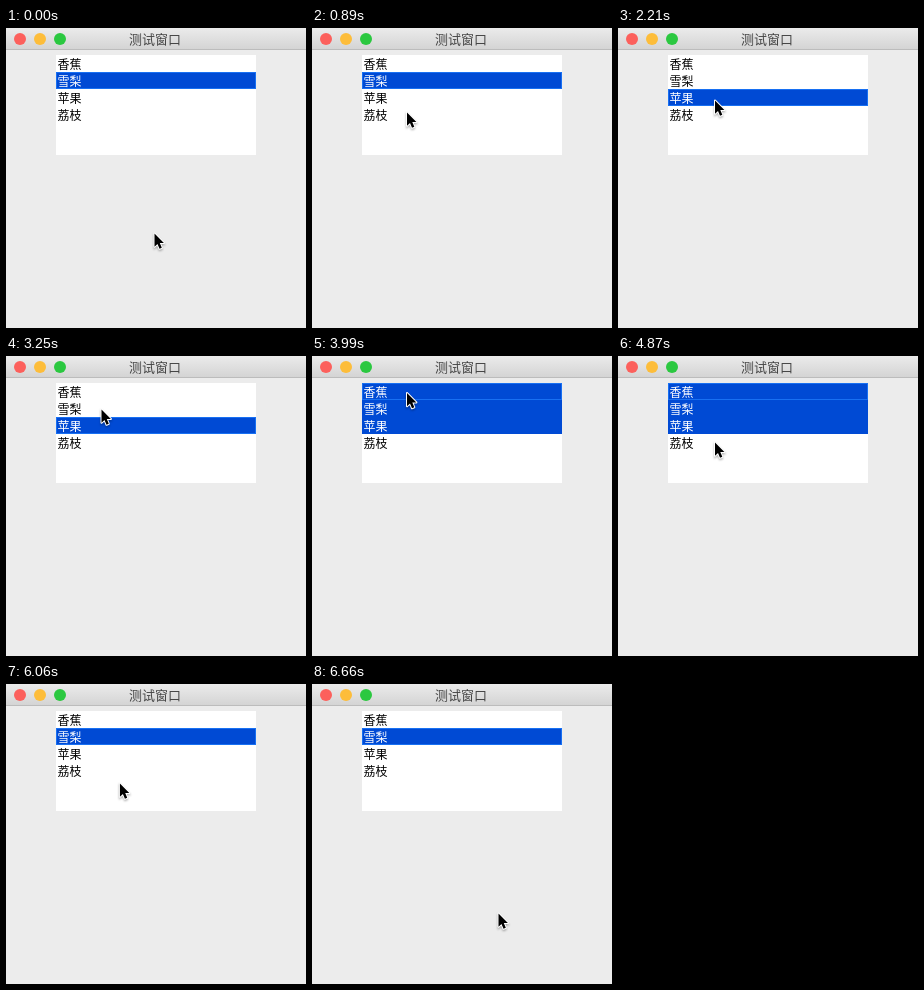
Write an HTML page that moves like this. It is 300 by 300 pixels and loops after 7.86 s.

```html
<!DOCTYPE html>
<html lang="zh-CN">
<head>
<meta charset="utf-8">
<title>测试窗口</title>
<style>
  html, body { margin: 0; width: 100%; height: 100%; overflow: hidden; background: #ececec; }
  svg { display: block; width: 100vw; height: 100vh; }
  text { font-family: "Noto Sans CJK SC", "Noto Sans CJK", "Noto Sans CJK JP", sans-serif; }
</style>
</head>
<body>
<svg viewBox="0 0 300 300">
  <defs>
    <linearGradient id="bar" x2="0" y2="1">
      <stop offset="0" stop-color="#ebebeb"/>
      <stop offset="1" stop-color="#d3d3d3"/>
    </linearGradient>
    <filter id="soft" x="-50%" y="-50%" width="200%" height="200%">
      <feGaussianBlur stdDeviation="0.9"/>
    </filter>
    <path id="arrow" d="M0 0V13.2L3 10.4L5 15.3L7.3 14.3L5.3 9.5H9.4Z"/>
  </defs>
  <rect width="300" height="300" fill="#ececec"/>
  <rect width="300" height="22" fill="url(#bar)"/>
  <rect y="21" width="300" height="1" fill="#bcbcbc"/>
  <g id="buttons"></g>
  <text x="149" y="16" font-size="13" text-anchor="middle" fill="#464646">测试窗口</text>
  <rect x="50" y="27" width="200" height="100" fill="#fff"/>
  <g id="list"></g>
  <g id="cursor">
    <use href="#arrow" y="1.5" opacity=".35" stroke="#000" stroke-width="1.5" filter="url(#soft)"/>
    <use href="#arrow" stroke="#fff" stroke-width="2" stroke-linejoin="round"/>
    <use href="#arrow"/>
  </g>
</svg>
<script>
const LOOP = 7860, TICK = 147.6, TOP = 27, ROW = 17;
const NS = "http://www.w3.org/2000/svg";
const cursor = document.getElementById("cursor");

function add(parent, name, attrs) {
  const el = document.createElementNS(NS, name);
  for (const key in attrs) el.setAttribute(key, attrs[key]);
  return document.getElementById(parent).appendChild(el);
}

["#fc605c", "#fdbd3a", "#2bc840"].forEach((fill, i) =>
  add("buttons", "circle", { cx: 14 + 20 * i, cy: 11, r: 6, fill }));

const rows = ["香蕉", "雪梨", "苹果", "荔枝"].map((label, i) => {
  const y = TOP + i * ROW;
  const fill = add("list", "rect", { x: 50, y, width: 200, height: ROW, fill: "#004ad4" });
  const ring = add("list", "rect",
    { x: 50.5, y: y + 0.5, width: 199, height: ROW - 1, fill: "none", stroke: "#1870f2" });
  const text = add("list", "text", { x: 51.5, y: y + 13.5, "font-size": 12 });
  text.textContent = label;
  return { fill, ring, text };
});

// Pointer rests: it waits from tick "at" until "leave", then glides to the next one.
const rests = [
  { at: 0, leave: 2, x: 148.5, y: 205.5 },
  { at: 6, leave: 8, x: 95, y: 84.5 },
  { at: 11, leave: 12, x: 93, y: 37.5 },
  { at: 15, leave: 17, x: 97, y: 72.5 },
  { at: 22, leave: 22, x: 95.5, y: 53.5 },
  { at: 25, leave: 28, x: 95, y: 37 },
  { at: 33, leave: 35, x: 97, y: 86.5 },
  { at: 38, leave: 39, x: 88.5, y: 54 },
  { at: 45, leave: 53, x: 186.5, y: 229.5 }
];

// Selected rows; the first of them has the focus ring.
const picks = [
  { at: 0, first: 1, last: 1 },
  { at: 7, first: 3, last: 3 },
  { at: 12, first: 0, last: 0 },
  { at: 15, first: 2, last: 2 },
  { at: 24, first: 1, last: 2 },
  { at: 26, first: 0, last: 2 },
  { at: 34, first: 3, last: 3 },
  { at: 39, first: 1, last: 1 }
];

const latest = (items, tick) => items.filter(item => item.at <= tick).pop();
const ease = u => u * u * (3 - 2 * u);

function pointer(tick) {
  const a = latest(rests, tick);
  const b = rests[rests.indexOf(a) + 1];
  if (!b || tick <= a.leave) return a;
  const u = ease((tick - a.leave) / (b.at - a.leave));
  return { x: a.x + (b.x - a.x) * u, y: a.y + (b.y - a.y) * u };
}

function show(el, on) {
  el.setAttribute("visibility", on ? "visible" : "hidden");
}

function draw(t) {
  const tick = Math.floor((t + 5) / TICK);
  const { x, y } = pointer(tick);
  const { first, last } = latest(picks, tick);
  cursor.setAttribute("transform", `translate(${x} ${y})`);
  rows.forEach(({ fill, ring, text }, i) => {
    const on = i >= first && i <= last;
    show(fill, on);
    show(ring, i === first);
    text.setAttribute("fill", on ? "#fff" : "#000");
  });
}

const begin = performance.now();
function loop() {
  draw((performance.now() - begin) % LOOP);
  requestAnimationFrame(loop);
}
loop();
</script>
</body>
</html>
```
